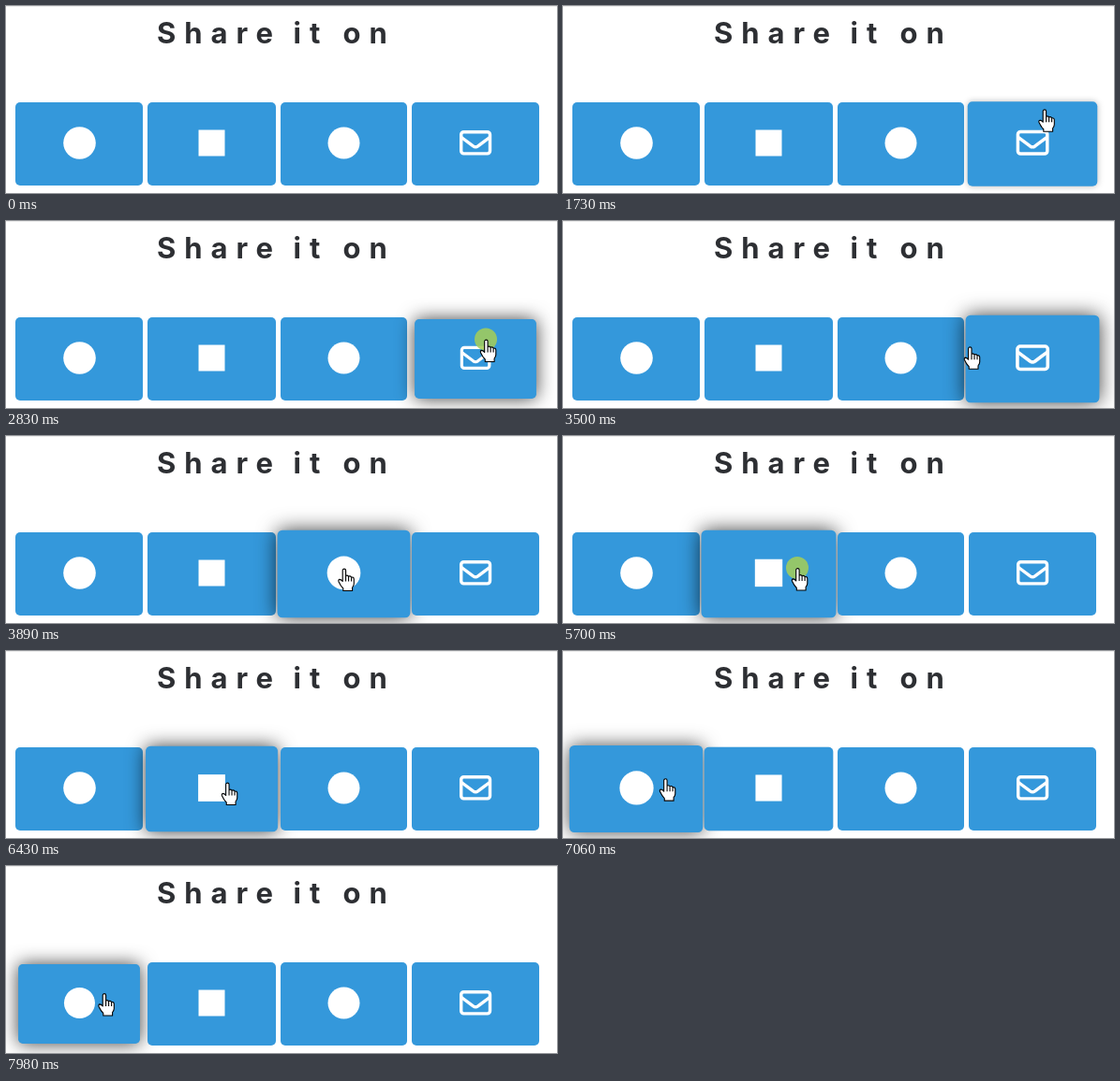
An HTML page for the animation above (8000 ms loop, 588 by 200 pixels).

```html
<!DOCTYPE html>
<html lang="en">
<head>
<meta charset="utf-8">
<title>Share buttons</title>
<style>
  html, body { margin: 0; width: 100%; height: 100%; overflow: hidden; background: #fff; }
  body { position: relative; }
  svg { position: absolute; left: 0; top: 0; overflow: visible; }
  #head { width: 588px; height: 60px; }
  #head text { font: 700 31px Inter, "Open Sans", sans-serif; letter-spacing: 9px; fill: #2d2f33; }
  .button { position: absolute; top: 103px; height: 89px; border-radius: 5px; background: #3498db; }
  .button svg { width: 100%; height: 100%; }
  .line { fill: none; stroke: #fff; stroke-width: 3.4; stroke-linejoin: round; }
  #pointer { width: 1px; height: 1px; }
  #dot { fill: #a3cd58; opacity: .87; }
  #hand, #arrow { fill: #fff; stroke: #000; stroke-width: 1.1; stroke-linejoin: round; }
</style>
</head>
<body>
<svg id="head">
  <rect width="588" height="1" fill="#ececec"/>
  <text y="39.5"><tspan x="161">Share</tspan> <tspan x="306.5">it</tspan> <tspan x="359.5">on</tspan></text>
</svg>

<div class="button" style="left:10px;width:136px"><svg><circle cx="68.5" cy="43.5" r="17.3" fill="#fff"/></svg></div>
<div class="button" style="left:151px;width:137px"><svg><rect x="54.5" y="29.5" width="28" height="28" fill="#fff"/></svg></div>
<div class="button" style="left:293px;width:135px"><svg><circle cx="67.5" cy="43.5" r="17" fill="#fff"/></svg></div>
<div class="button" style="left:433px;width:136px"><svg class="line">
  <rect x="52.7" y="31.7" width="30.8" height="23.2" rx="2.8"/>
  <path d="M53 37.5L65.6 46.9Q68.1 48.6 70.6 46.9L83.2 37.5"/>
</svg></div>

<svg id="pointer">
  <circle id="dot" r="12"/>
  <path id="arrow" d="M.5 .5V17L4.3 13.4L6.7 19L9.2 18L6.8 12.4H12Z"/>
  <path id="hand" d="M-1.3 14V2.3a1.7 1.7 0 0 1 3.4 0V8q1.6-1 3 .6q2-.7 3 .9q2.4-.4 2.7 2V16.5q0 2-1.7 4V24H-.7V21.5q-2.6-2.5-4.8-7.3q-.6-2 1-2.3q1.6 0 3.2 2.1ZM2.1 8v6M5.1 9v5M8.1 10v4"/>
</svg>

<script>
const LOOP = 8000, FADE = 330, HOVER = 1.05, PRESS = 0.955;
const ENTER = 830, ON_BUTTON = 1640;

// Moments of each button, left to right; a missing one lies beyond the loop
const buttons = [
  { over: 6830, down: 7370, up: 7980 },
  { over: 4930, down: 5700, up: 6220, out: 6850 },
  { over: 3560, down: 3940, up: 4530, out: 4930 },
  { over: 1655, down: 2470, up: 3110, out: 3540 },
];

// Pointer legs: start, end, from, to
const legs = [
  [830, 1640, [589, 63], [514, 105]],
  [1640, 1900, [514, 105], [512, 126.5]],
  [3110, 3880, [512, 126.5], [360.5, 141.5]],
  [4530, 5200, [360.5, 141.5], [250, 141]],
  [6220, 7180, [250, 141], [104.5, 136]],
];

const clamp = v => Math.min(1, Math.max(0, v));
const mix = (a, b, k) => a + (b - a) * k;
const easeInOut = k => k < 0.5 ? 2 * k * k : 1 - 2 * (1 - k) ** 2;

// CSS "ease": cubic-bezier(.25, .1, .25, 1)
function ease(x) {
  const bezier = (a, b, s) => 3 * a * s * (1 - s) ** 2 + 3 * b * s * s * (1 - s) + s ** 3;
  let lo = 0, hi = 1;
  for (let i = 0; i < 20; i++) {
    const mid = (lo + hi) / 2;
    if (bezier(0.25, 0.25, mid) < x) lo = mid; else hi = mid;
  }
  return x <= 0 ? 0 : x >= 1 ? 1 : bezier(0.1, 1, lo);
}

const fade = (t, start = Infinity) => ease(clamp((t - start) / FADE));

function drawButton(el, { over, down, up, out }, t) {
  const shadow = fade(t, over) - fade(t, out);
  let scale = mix(1, HOVER, fade(t, over));
  scale = mix(scale, PRESS, fade(t, down + 20));
  scale = mix(scale, HOVER, fade(t, up + 55));
  scale = mix(scale, 1, fade(t, out));
  el.style.transform = `scale(${scale})`;
  el.style.boxShadow = `0 0 ${20 * shadow}px rgba(0,0,0,${0.75 * shadow})`;
}

function pointerAt(t) {
  const [start, end, from, to] = legs.findLast(leg => t >= leg[0]) || legs[0];
  const k = easeInOut(clamp((t - start) / (end - start)));
  return from.map((v, i) => mix(v, to[i], k));
}

const boxes = document.querySelectorAll(".button");
const [pointer, dot, arrow, hand] = ["pointer", "dot", "arrow", "hand"].map(id => document.getElementById(id));
const show = (el, visible) => el.style.display = visible ? "" : "none";

function draw() {
  const t = performance.now() % LOOP;
  buttons.forEach((button, i) => drawButton(boxes[i], button, t));
  const [x, y] = pointerAt(t);
  pointer.style.transform = `translate(${x}px, ${y}px)`;
  show(arrow, t >= ENTER && t < ON_BUTTON);
  show(hand, t >= ON_BUTTON);
  show(dot, buttons.some(b => t >= b.down && t < b.up));
  requestAnimationFrame(draw);
}
draw();
</script>
</body>
</html>
```
